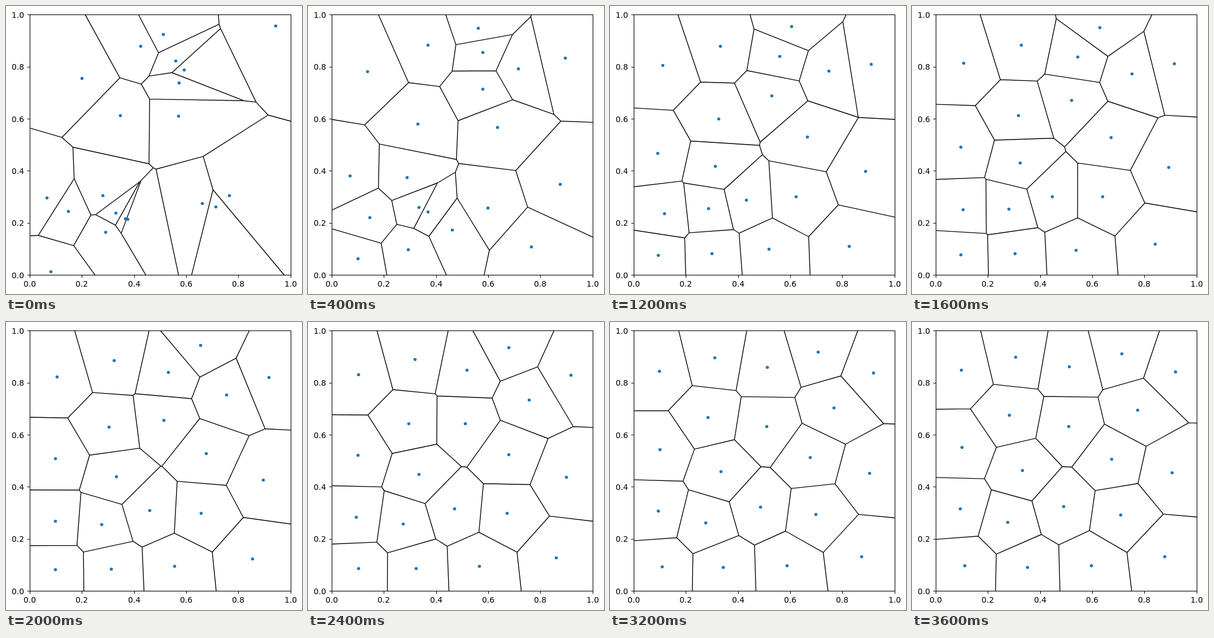
Write an HTML page with a canvas that moves like this. It is 524 px wide and 511 px high and loops after 4000 ms.

```html
<!DOCTYPE html>
<html lang="en">
<head>
<meta charset="utf-8">
<title>Lloyd relaxation</title>
<style>
html, body { margin: 0; width: 100%; height: 100%; overflow: hidden; background: #fff; }
canvas { display: block; }
</style>
</head>
<body>
<canvas id="stage" width="524" height="511"></canvas>
<script>
const ctx = document.getElementById('stage').getContext('2d');
// Coordinates are relative to pixel centres; lines of the frame snap to whole pixels.
const L = 41.8, T = 15.2, SIZE = 462, R = L + SIZE, B = T + SIZE;
const STEP = 400, STEPS = 10;
const snap = Math.round;

const seeds = [
  [477, 35], [278, 50], [238, 71], [300, 96.5], [315, 113],
  [306, 136], [134, 128], [202, 194], [305, 195], [72, 340],
  [110, 364], [171, 336], [194, 367], [211, 376.5], [215, 378],
  [176, 401], [79, 471], [347, 350], [371, 356], [395, 336]
];

// Keep the part of poly nearer to p than to q. Each vertex is [x, y, neighbour],
// naming the site across the edge that starts there (-1 for the frame).
function clip(poly, p, q, id) {
  const nx = q[0] - p[0], ny = q[1] - p[1];
  const mx = (p[0] + q[0]) / 2, my = (p[1] + q[1]) / 2;
  const side = v => (v[0] - mx) * nx + (v[1] - my) * ny;
  const out = [];
  poly.forEach((a, k) => {
    const b = poly[(k + 1) % poly.length];
    const da = side(a), db = side(b);
    if (da <= 0) out.push(a);
    if ((da <= 0) !== (db <= 0)) {
      const s = da / (da - db);
      out.push([a[0] + (b[0] - a[0]) * s, a[1] + (b[1] - a[1]) * s, da <= 0 ? id : a[2]]);
    }
  });
  return out;
}

function cell(sites, i) {
  let poly = [[L, T, -1], [R, T, -1], [R, B, -1], [L, B, -1]];
  sites.forEach((q, j) => { if (j !== i) poly = clip(poly, sites[i], q, j); });
  return poly;
}

function centroid(poly) {
  const [ox, oy] = poly[0];
  let area = 0, x = 0, y = 0;
  poly.forEach((a, k) => {
    const b = poly[(k + 1) % poly.length];
    const ax = a[0] - ox, ay = a[1] - oy, bx = b[0] - ox, by = b[1] - oy;
    const w = ax * by - bx * ay;
    area += w;
    x += (ax + bx) * w;
    y += (ay + by) * w;
  });
  return [ox + x / (3 * area), oy + y / (3 * area)];
}

const states = [];
for (let sites = seeds; states.length < STEPS;) {
  const cells = sites.map((_, i) => cell(sites, i));
  states.push({ sites, cells });
  sites = cells.map(centroid);
}

function line(x1, y1, x2, y2) {
  ctx.moveTo(x1, y1);
  ctx.lineTo(x2, y2);
}

// Text origins fall on pixel corners.
function text(label, x, y) {
  ctx.fillText(label, snap(x) - 0.5, snap(y) - 0.5);
}

function drawAxes() {
  const left = snap(L), bottom = snap(B);
  ctx.lineWidth = 1.11;
  ctx.strokeRect(left, snap(T), SIZE, SIZE);
  ctx.fillStyle = '#000';
  ctx.font = '13.89px "DejaVu Sans", sans-serif';
  ctx.beginPath();
  for (let k = 0; k <= 5; k++) {
    const x = L + SIZE * k / 5, y = B - SIZE * k / 5;
    const label = (k / 5).toFixed(1);
    line(snap(x), bottom, snap(x), bottom + 4.86);
    line(left, snap(y), left - 4.86, snap(y));
    text(label, x - 11, B + 20.8);
    text(label, L - 31.8, y + 5.6);
  }
  ctx.stroke();
}

function draw({ sites, cells }) {
  ctx.setTransform(1, 0, 0, 1, 0, 0);
  ctx.fillStyle = '#fff';
  ctx.fillRect(0, 0, 524, 511);
  ctx.translate(0.5, 0.5);
  ctx.strokeStyle = '#000';

  // each shared edge is stroked once
  ctx.lineWidth = 1.39;
  ctx.beginPath();
  cells.forEach((poly, i) => poly.forEach((a, k) => {
    const b = poly[(k + 1) % poly.length];
    if (a[2] > i) line(a[0], a[1], b[0], b[1]);
  }));
  ctx.stroke();

  ctx.fillStyle = '#1f77b4';
  for (const [x, y] of sites) {
    ctx.beginPath();
    ctx.arc(snap(x), snap(y), 2.78, 0, 2 * Math.PI);
    ctx.fill();
  }
  drawAxes();
}

function tick() {
  draw(states[Math.floor(performance.now() / STEP) % STEPS]);
  requestAnimationFrame(tick);
}
tick();
</script>
</body>
</html>
```
